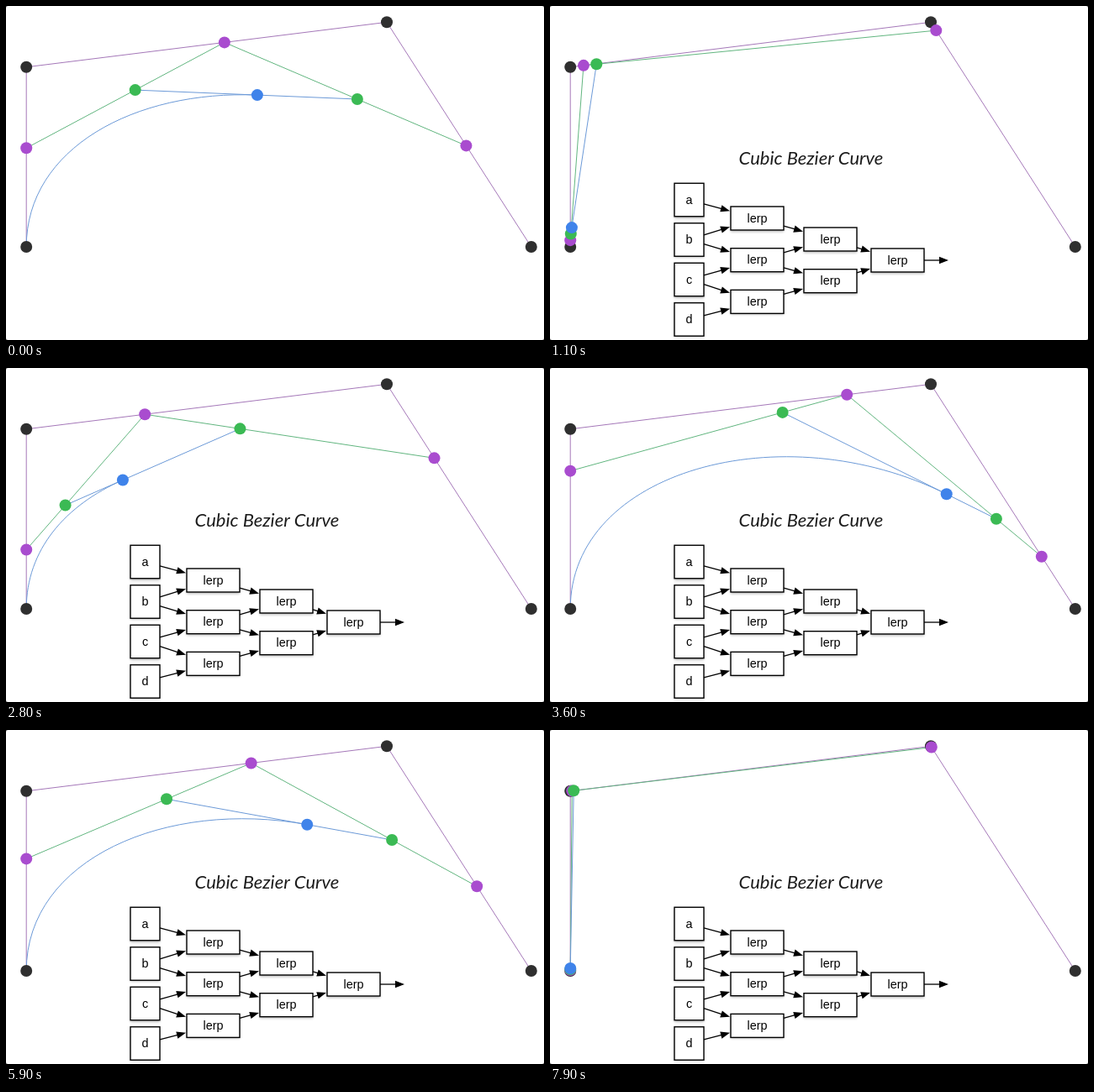
These frames come from a looping animation (640 by 398 pixels, 8 s). An HTML page with a canvas:

```html
<!DOCTYPE html>
<html lang="en">
<head>
<meta charset="utf-8">
<title>Cubic Bezier Curve</title>
<style>
  html, body { margin: 0; width: 100%; height: 100%; overflow: hidden; background: #fff; }
  canvas { display: block; }
</style>
</head>
<body>
<canvas id="stage" width="640" height="398"></canvas>
<script>
const ctx = document.getElementById("stage").getContext("2d");

const LOOP = 8000, STEP = 100;
const PURPLE = { dot: "#a94ccf", line: "#a578b9" };
const GREEN = { dot: "#3bba54", line: "#62b680" };
const BLUE = { dot: "#3f83ea", line: "#6c9ad8" };
const CONTROL = [[24.2, 287], [24.2, 72.8], [453, 19.3], [624.8, 287]];

// Each sweep eases between its two ends, then rests until the next one.
const SWEEPS = [
  { start: -1260, end: 1430, from: 1, to: 0 },
  { start: 1730, end: 4482, from: 0, to: 1 },
  { start: 4743, end: 7495, from: 1, to: 0 },
  { start: 7780, end: 10532, from: 0, to: 1 }
];

const clamp = x => Math.min(1, Math.max(0, x));
const mix = (a, b, t) => a + (b - a) * t;
const lerp = (p, q, t) => [mix(p[0], q[0], t), mix(p[1], q[1], t)];
const lerpAll = (points, t) => points.slice(1).map((p, i) => lerp(points[i], p, t));

function progress(time) {
  const s = SWEEPS.filter(sweep => sweep.start <= time).pop();
  const k = clamp((time - s.start) / (s.end - s.start));
  return mix(s.from, s.to, (1 - Math.cos(Math.PI * k)) / 2);
}

function polyline(points, color, width = 1) {
  ctx.beginPath();
  points.forEach(p => ctx.lineTo(...p));
  ctx.strokeStyle = color;
  ctx.lineWidth = width;
  ctx.stroke();
}

function dots(points, color) {
  ctx.fillStyle = color;
  for (const [x, y] of points) {
    ctx.beginPath();
    ctx.arc(x, y, 7, 0, Math.PI * 2);
    ctx.fill();
  }
}

function drawConstruction(t) {
  const first = lerpAll(CONTROL, t);
  const second = lerpAll(first, t);
  const [tip] = lerpAll(second, t);

  polyline(CONTROL, PURPLE.line);
  polyline(first, GREEN.line);
  polyline(second, BLUE.line);

  // The part of the curve before t has these points as its own controls.
  ctx.beginPath();
  ctx.moveTo(...CONTROL[0]);
  ctx.bezierCurveTo(...first[0], ...second[0], ...tip);
  ctx.stroke();

  dots(CONTROL, "#2f2f2f");
  dots(first, PURPLE.dot);
  dots(second, GREEN.dot);
  dots([tip], BLUE.dot);
}

const node = (label, x, y, w, h) => ({ label, x, y, w, h });
const column = (labels, x, y, gap, w, h) =>
  labels.map((label, i) => node(label, x, y + i * gap, w, h));

const COLUMNS = [
  column(["a", "b", "c", "d"], 165.5, 231, 47.5, 35, 39.5),
  column(["lerp", "lerp", "lerp"], 246.5, 253, 49.7, 63, 28),
  column(["lerp", "lerp"], 333.5, 278, 49.7, 63, 28),
  column(["lerp"], 413.5, 303, 0, 63, 28)
];

function arrow(x1, y1, x2, y2) {
  const angle = Math.atan2(y2 - y1, x2 - x1);
  const length = Math.hypot(x2 - x1, y2 - y1);
  ctx.save();
  ctx.translate(x2, y2);
  ctx.rotate(angle);
  polyline([[-length, 0], [-8, 0]], "#000", 1.3);
  ctx.beginPath();
  ctx.moveTo(0, 0);
  ctx.lineTo(-11, -4.2);
  ctx.lineTo(-11, 4.2);
  ctx.fillStyle = "#000";
  ctx.fill();
  ctx.restore();
}

function connect(from, to) {
  const x1 = from.x + from.w / 2, x2 = to.x - to.w / 2;
  const slope = (to.y - from.y) / (to.x - from.x);
  const yAt = x => from.y + slope * (x - from.x);
  arrow(x1, yAt(x1), x2 - 1, yAt(x2 - 1));
}

function drawNode({ label, x, y, w, h }) {
  const box = [x - w / 2, y - h / 2, w, h];
  ctx.save();
  ctx.shadowColor = "rgba(0,0,0,.28)";
  ctx.shadowBlur = 3;
  ctx.shadowOffsetY = 2;
  ctx.fillStyle = "#fff";
  ctx.fillRect(...box);
  ctx.restore();
  ctx.strokeStyle = "#000";
  ctx.lineWidth = 1.4;
  ctx.strokeRect(...box);
  ctx.fillStyle = "#000";
  ctx.font = '14.4px "Liberation Sans", Arial, sans-serif';
  ctx.fillText(label, x, y + 4.6);
}

function drawDiagram(alpha) {
  ctx.save();
  ctx.globalAlpha = alpha;
  ctx.textAlign = "center";
  ctx.fillStyle = "#1c1c1c";
  ctx.font = 'italic 22px Lato, "Open Sans", sans-serif';
  ctx.fillText("Cubic Bezier Curve", 310.5, 189);

  COLUMNS.flat().forEach(drawNode);
  COLUMNS.slice(1).forEach((nodes, i) => nodes.forEach((to, j) => {
    connect(COLUMNS[i][j], to);
    connect(COLUMNS[i][j + 1], to);
  }));
  arrow(445, 303, 474, 303);
  ctx.restore();
}

function drawBackground() {
  ctx.fillStyle = "#555";
  ctx.fillRect(0, 0, 640, 398);
  ctx.fillStyle = "#fff";
  ctx.beginPath();
  ctx.roundRect(0, 0, 640, 398, 2.5);
  ctx.fill();
}

function frame() {
  const time = Math.floor((performance.now() % LOOP) / STEP) * STEP;
  drawBackground();
  drawDiagram(clamp((time - 860) / 240));
  drawConstruction(progress(time));
  requestAnimationFrame(frame);
}
frame();
</script>
</body>
</html>
```
